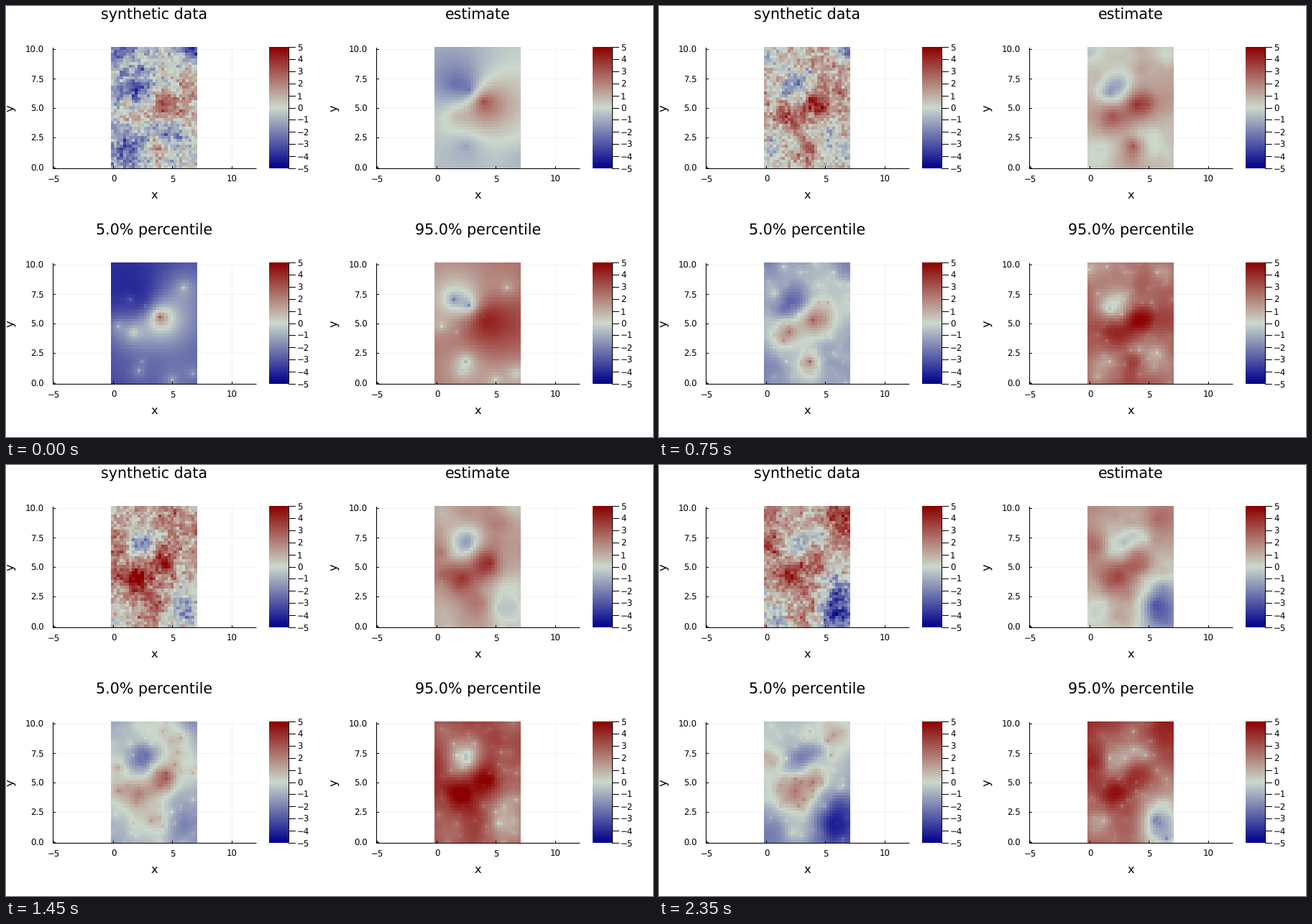
These frames come from a looping animation (900 by 600 pixels, 2.4 s). A matplotlib script:

```python
import numpy as np
import matplotlib.pyplot as plt
from matplotlib.animation import FuncAnimation
from matplotlib.colors import LinearSegmentedColormap

FRAMES, INTERVAL = 48, 50
PX = 0.72  # points per pixel at 100 dpi
plt.rcParams["font.family"] = "DejaVu Sans"
plt.rcParams["text.hinting"] = "none"
CMAP = LinearSegmentedColormap.from_list(
    "bluesreds", ["darkblue", (0.8, 0.85, 0.8), "darkred"])

rng = np.random.default_rng(12)
xs, ys = np.arange(29) * 0.25, np.arange(41) * 0.25
GX, GY = np.meshgrid(xs, ys)

# Hills and hollows: x, y, radius, height at the start, middle and end
BLOBS = [
    (2.0, 6.5, 1.1, -2.7, -2.2, -1.2),
    (2.9, 7.6, 0.9, -0.5, -3.0, -2.0),
    (4.3, 5.2, 1.1, 3.6, 2.8, 1.6),
    (5.7, 5.2, 1.4, 1.5, 0.0, -1.2),
    (2.0, 4.0, 1.1, 1.6, 3.6, 2.9),
    (3.7, 1.4, 0.9, 2.2, 1.4, 1.2),
    (3.5, 2.8, 0.8, -0.3, 0.0, 1.0),
    (0.4, 6.6, 0.9, -0.8, 1.5, 2.0),
    (4.6, 7.7, 0.8, 0.8, 0.0, -2.1),
    (4.9, 8.9, 1.0, 0.8, 0.6, 0.2),
    (6.3, 9.3, 1.3, -0.8, -0.5, 2.2),
    (6.9, 9.9, 0.8, -3.0, -2.2, 0.0),
    (0.6, 9.4, 1.2, -1.8, -1.3, 0.9),
    (6.6, 7.0, 1.0, 1.5, 0.0, 0.9),
    (1.6, 2.2, 1.3, -2.0, 0.0, -0.4),
    (0.6, 0.7, 1.2, -1.4, -1.2, -2.5),
    (5.9, 1.0, 1.5, -0.1, -1.4, -5.2),
    (5.2, 2.8, 1.0, -2.0, -0.6, -1.2),
    (6.7, 3.2, 1.2, 0.4, -0.6, -2.4),
]
FIRST_SENSORS = [(4, 5.5), (1.75, 4.25), (1.5, 7), (2.75, 6.5), (6, 8),
                 (0.5, 4.75), (2.5, 1.75), (2.25, 1), (6.75, 0.75), (5, 0.25)]
RANGE, MEMORY, SIGMA, NUGGET = 3, 25, 1.8, 0.02
PER_FRAME, WINDOW = 10, 14


def between(i, start, middle, end):
    return np.interp(i / (FRAMES - 1), [0, 0.5, 1], [start, middle, end])


def base(i):
    return between(i, -0.4, 1.6, 1.3)


def landscape(i):
    field = np.full(GX.shape, base(i))
    for x, y, r, *heights in BLOBS:
        d2 = (GX - x) ** 2 + (GY - y) ** 2
        field += between(i, *heights) * np.exp(-d2 / r ** 2)
    return field


def drifting_noise(size, memory):
    """Unit noise that changes slowly; size 0 gives independent cells."""
    def blur(p):
        k = np.exp(-((p[:, None] - p) / size) ** 2)
        return k / np.sqrt((k ** 2).sum(axis=1, keepdims=True))

    def draw():
        n = rng.standard_normal(GX.shape)
        return blur(ys) @ n @ blur(xs).T if size else n

    out = [draw()]
    for _ in range(FRAMES - 1):
        out.append(memory * out[-1] + np.sqrt(1 - memory ** 2) * draw())
    return np.array(out)


def covariance(a, b):
    """Correlation between rows of (x, y, frame)."""
    gap = np.abs(a[:, None] - b[None])
    return np.exp(-np.hypot(gap[..., 0], gap[..., 1]) / RANGE
                  - gap[..., 2] / MEMORY)


def krige(fields):
    """Estimate and half band width from a few new sensor readings a frame."""
    sensors, readings = np.empty((0, 3)), np.empty(0)
    keep = PER_FRAME * WINDOW
    estimates, bands = [], []
    for i, field in enumerate(fields):
        if i:
            spots = rng.integers((0, 0), (len(xs), len(ys)), (PER_FRAME, 2))
        else:
            spots = (np.array(FIRST_SENSORS) * 4).astype(int)
        new = np.column_stack([spots / 4, np.full(PER_FRAME, i)])
        seen = field[spots[:, 1], spots[:, 0]] - base(i)
        sensors = np.vstack([sensors, new])[-keep:]
        readings = np.append(readings, seen)[-keep:]

        cells = np.column_stack([GX.ravel(), GY.ravel(), np.full(GX.size, i)])
        cross = covariance(sensors, cells)
        own = covariance(sensors, sensors) + NUGGET * np.eye(len(sensors))
        weights = np.linalg.solve(own, cross)
        variance = np.maximum(1 - (weights * cross).sum(axis=0), 0)
        estimates.append((base(i) + readings @ weights).reshape(GX.shape))
        bands.append((1.645 * SIGMA * np.sqrt(variance)).reshape(GX.shape))
    return np.array(estimates), np.array(bands)


truth = np.array([landscape(i) for i in range(FRAMES)])
texture = drifting_noise(0.3, 0.93)
data = truth + 0.5 * texture + 0.55 * drifting_noise(0, 0.85)
estimate, band = krige(truth + 0.3 * texture)

fig = plt.figure(figsize=(9, 6), dpi=100, facecolor="white")
ax = fig.add_axes([0, 0, 1, 1])
ax.set_xlim(0, 900)
ax.set_ylim(600, 0)
ax.axis("off")


def line(x0, y0, x1, y1, color="black", z=3):
    ax.plot([x0, x1], [y0, y1], color=color, lw=PX, zorder=z,
            solid_capstyle="butt", snap=False)


def label(x, y, s, size, ha="center", va="baseline", **kw):
    ax.text(x, y, str(s).replace("-", "\u2212"), fontsize=size * PX,
            ha=ha, va=va, **kw)


def picture(values, x0, x1, y0, y1):
    return ax.imshow(values, cmap=CMAP, vmin=-5, vmax=5, origin="lower",
                     extent=(x0, x1, y1, y0), aspect="auto",
                     interpolation="nearest", zorder=2)


def middle(v):
    """Centre of the pixel that holds v, for crisp lines."""
    return np.floor(v) + 0.5


def panel(ox, oy, title, fields):
    label(ox + 206.5, oy + 18.3, title, 20.7)
    for v in (-5, 0, 5, 10):
        x = middle(ox + 149 + 16.5 * v)
        line(x, oy + 58, x, oy + 226, "#f2f2f2", 1)
        line(x, oy + 223, x, oy + 227)
        label(x, oy + 245, v, 11.8)
    for v in (0, 2.5, 5, 7.5, 10):
        y = middle(oy + 225 - 16.5 * v)
        line(ox + 65, y, ox + 348, y, "#f2f2f2", 1)
        line(ox + 65, y, ox + 69, y)
        label(ox + 52.5, y + 4, f"{v:.1f}", 11.8, "right")
    line(ox + 65.5, oy + 58, ox + 65.5, oy + 227)
    line(ox + 65, oy + 226.5, ox + 348.5, oy + 226.5)
    label(ox + 206.5, oy + 267.5, "x", 16.3)
    label(ox + 7, oy + 142.5, "y", 16.3, va="center", rotation=90)

    picture(np.linspace(-5, 5, 256)[:, None], ox + 366, ox + 393,
            oy + 57, oy + 226)
    line(ox + 393.5, oy + 57, ox + 393.5, oy + 227)
    for v in range(-5, 6):
        y = middle(oy + 142 - 16.9 * v)
        line(ox + 393, y, ox + 403, y)
        label(ox + 405, y + 4, v, 11.8, "left")
    return picture(fields[0], ox + 146, ox + 266, oy + 57, oy + 226), fields


panels = [
    panel(0, 0, "synthetic data", data),
    panel(450, 0, "estimate", estimate),
    panel(0, 300, "5.0% percentile", estimate - band),
    panel(450, 300, "95.0% percentile", estimate + band),
]


def update(i):
    for image, fields in panels:
        image.set_data(fields[i])
    return [image for image, _ in panels]


anim = FuncAnimation(fig, update, frames=FRAMES, interval=INTERVAL,
                     repeat=True, repeat_delay=0)
plt.show()
```
